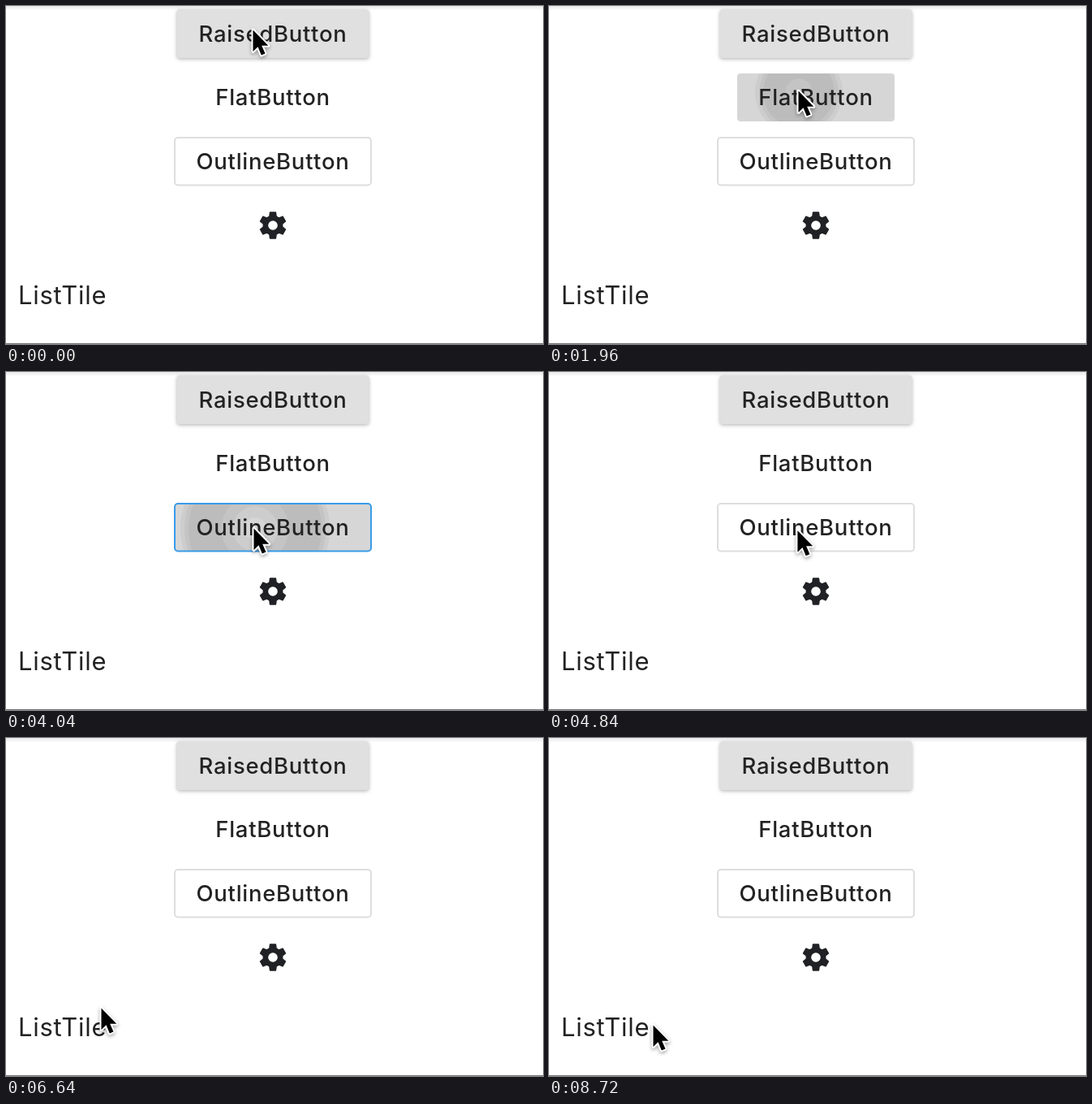
Write an HTML page with a canvas that moves like this. It is 662 px wide and 416 px high and loops after 8.84 s.

```html
<!DOCTYPE html>
<html lang="en">
<head>
<meta charset="utf-8">
<title>Button ripples</title>
<style>
  html, body { margin: 0; width: 100%; height: 100%; overflow: hidden; background: #fff; }
  canvas { display: block; }
</style>
</head>
<body>
<canvas id="stage" width="662" height="416"></canvas>
<script>
const ctx = document.getElementById('stage').getContext('2d');
const LOOP = 8840, STEP = 40, FADE = 200;
const INK = '#222';

const raised = { x: 210.5, y: 4, w: 237, h: 60, label: 'RaisedButton', down: 80, up: 1080 };
const flat = { x: 232, y: 83, w: 194, h: 59, label: 'FlatButton', down: 1760, up: 2800 };
const outline = { x: 208, y: 162, w: 242, h: 58.5, label: 'OutlineButton', down: 3700, up: 4600 };
const gear = { x: 329, y: 270, down: 5480, up: 5880 };
const tile = { x: 0, y: 309, w: 662, h: 92 };

// Pointer route: time, x, y
const route = [
  [0, 304, 29], [1120, 304, 29], [1400, 307, 104],
  [2900, 307, 104], [3080, 311, 136], [3440, 305, 192],
  [4800, 305, 192], [5160, 332, 270], [5320, 331, 263],
  [6000, 331, 263], [6280, 200, 372], [6440, 97, 372], [6640, 117, 332],
  [8040, 117, 332], [8320, 128, 353], [LOOP, 128, 353]
];

const clamp = v => Math.max(0, Math.min(1, v));
const mix = (a, b, k) => a + (b - a) * k;
const smooth = k => k * k * (3 - 2 * k);
const black = a => `rgba(0,0,0,${a})`;

// cubic-bezier(.25, .1, .25, 1)
function ease(x) {
  if (x >= 1) return 1;
  let lo = 0, hi = 1;
  for (let i = 0; i < 20; i++) {
    const s = (lo + hi) / 2, q = 1 - s;
    if (.75 * s * q + s ** 3 < x) lo = s; else hi = s;
  }
  const q = 1 - lo;
  return .3 * lo * q * q + 3 * lo * lo * q + lo ** 3;
}

function pointerAt(t) {
  const i = route.findIndex(p => p[0] > t);
  const [t0, x0, y0] = route[i - 1], [t1, x1, y1] = route[i];
  const k = smooth((t - t0) / (t1 - t0));
  return [mix(x0, x1, k), mix(y0, y1, k)];
}

const level = (t, p) => clamp((t - p.down) / FADE) * (1 - clamp((t - p.up) / FADE));

function box(b, r) {
  ctx.beginPath();
  ctx.roundRect(b.x, b.y, b.w, b.h, r);
}

function disc(x, y, r, fill) {
  ctx.beginPath();
  ctx.arc(x, y, r, 0, Math.PI * 2);
  ctx.fillStyle = fill;
  ctx.fill();
}

function ring(x, y, inner, outer, fill) {
  if (outer <= inner) return;
  ctx.beginPath();
  ctx.arc(x, y, outer, 0, Math.PI * 2);
  ctx.arc(x, y, Math.max(0, inner), 0, Math.PI * 2);
  ctx.fillStyle = fill;
  ctx.fill('evenodd');
}

// Highlight plus a banded wave that clears from the middle
function ink(t, b, px, py) {
  const on = level(t, b);
  if (!on) return;
  ctx.save();
  box(b, 4);
  ctx.clip();
  ctx.fillStyle = black(.16 * on);
  ctx.fillRect(b.x, b.y, b.w, b.h);
  const age = Math.min(t - b.down, 900);
  const reach = Math.hypot(b.w, b.h) / 2 + 5;
  const k = ease(age / 1000);
  const radius = reach * mix(.3, 1, k) + 30 * clamp((age - 400) / 400);
  const x = mix(px, b.x + b.w / 2, k * .15);
  const inner = (age - 264) * .18;
  for (let i = 0; i < 3; i++) {
    ring(x, py, inner + 14 * i, radius - 5 * i, black(.042 * on));
  }
  ctx.restore();
}

function text(str, x, y, font, align, spacing) {
  ctx.font = font;
  ctx.textAlign = align;
  ctx.letterSpacing = spacing;
  ctx.fillStyle = INK;
  ctx.fillText(str, x, y);
}

const caption = (b, y) => text(b.label, 329, y, '500 27.5px Inter, sans-serif', 'center', '0.72px');

function drawRaised(t) {
  const on = level(t, raised);
  ctx.save();
  ctx.shadowColor = black(mix(.28, .3, on));
  ctx.shadowBlur = mix(4, 15, on);
  ctx.shadowOffsetY = mix(1.5, 6, on);
  ctx.fillStyle = '#e0e0e0';
  box(raised, 4);
  ctx.fill();
  ctx.restore();
  ink(t, raised, 304, 34);
  caption(raised, 43.5);
}

function drawFlat(t) {
  ink(t, flat, 307, 106);
  caption(flat, 122);
}

function drawOutline(t) {
  ink(t, outline, 305, 193);
  const on = level(t, outline);
  ctx.strokeStyle = `rgb(${mix(222, 58, on)},${mix(222, 155, on)},${mix(222, 232, on)})`;
  ctx.lineWidth = 2;
  box(outline, 4);
  ctx.stroke();
  caption(outline, 201);
}

function gearPath() {
  const tooth = [[-2.87, -6.93], [-2.45, -10], [2.45, -10], [2.87, -6.93]];
  const pts = [];
  for (let i = 0; i < 6; i++) {
    const c = Math.cos(i * Math.PI / 3), s = Math.sin(i * Math.PI / 3);
    for (const [x, y] of tooth) pts.push([x * c - y * s, x * s + y * c]);
  }
  const path = new Path2D();
  path.moveTo(...pts[0]);
  for (let i = 1; i < pts.length; i++) {
    path.arcTo(...pts[i], ...pts[(i + 1) % pts.length], .45);
  }
  path.closePath();
  path.moveTo(3.5, 0);
  path.arc(0, 0, 3.5, 0, Math.PI * 2);
  return path;
}
const gearShape = gearPath();

function drawGear(t) {
  const on = level(t, gear);
  if (on) {
    const k = ease(clamp((t - gear.down) / 240));
    disc(gear.x, gear.y, 57, black(.12 * on));
    disc(gear.x, gear.y, mix(17, 42, k), black(.02 * on));
    disc(gear.x, gear.y, mix(10, 28, k), black(.025 * on));
  }
  ctx.save();
  ctx.translate(gear.x, gear.y);
  ctx.scale(5 / 3, 5 / 3);
  ctx.fillStyle = '#202124';
  ctx.fill(gearShape, 'evenodd');
  ctx.restore();
}

function drawTile(t) {
  ctx.save();
  box(tile, 0);
  ctx.clip();
  const first = { down: 7120, up: 7560 }, second = { down: 8480, up: 8520 };
  const on = level(t, first);
  if (on) {
    const age = Math.min(t - first.down, 220) + Math.max(0, t - first.up) * .5;
    const k = ease(age / 1000);
    disc(mix(117, 331, k), mix(340, 355, k), mix(100, 334, k), black(.09 * on));
  }
  const tap = level(t, second);
  if (tap) disc(121, 355, 78, black(.06 * tap));
  ctx.restore();
  text('ListTile', 15, 366.5, '400 31px Inter, sans-serif', 'left', '0.7px');
}

function drawPointer(x, y) {
  const arrow = [[0, 0], [0, 26.5], [6, 20.8], [10.3, 31], [15, 29], [10.7, 19.2], [18.8, 19.2]];
  ctx.save();
  ctx.translate(x + .5, y + .5);
  ctx.beginPath();
  arrow.forEach(p => ctx.lineTo(...p));
  ctx.closePath();
  ctx.lineJoin = 'round';
  ctx.lineWidth = 4;
  ctx.strokeStyle = '#fff';
  ctx.shadowColor = black(.35);
  ctx.shadowBlur = 4;
  ctx.shadowOffsetY = 2;
  ctx.stroke();
  ctx.shadowColor = 'transparent';
  ctx.fillStyle = '#000';
  ctx.fill();
  ctx.restore();
}

function drawEdges() {
  const shade = ctx.createLinearGradient(0, 0, 0, 5);
  shade.addColorStop(0, '#ebebeb');
  shade.addColorStop(.6, '#f3f3f3');
  shade.addColorStop(1, '#fff');
  ctx.fillStyle = shade;
  ctx.fillRect(0, 0, 662, 5);
  ctx.fillStyle = '#757575';
  ctx.fillRect(0, 415, 662, 1);
}

function frame() {
  const t = Math.floor(performance.now() % LOOP / STEP) * STEP;
  ctx.fillStyle = '#fff';
  ctx.fillRect(0, 0, 662, 416);
  drawEdges();
  drawRaised(t);
  drawFlat(t);
  drawOutline(t);
  drawTile(t);
  drawGear(t);
  drawPointer(...pointerAt(t));
  requestAnimationFrame(frame);
}
frame();
</script>
</body>
</html>
```
